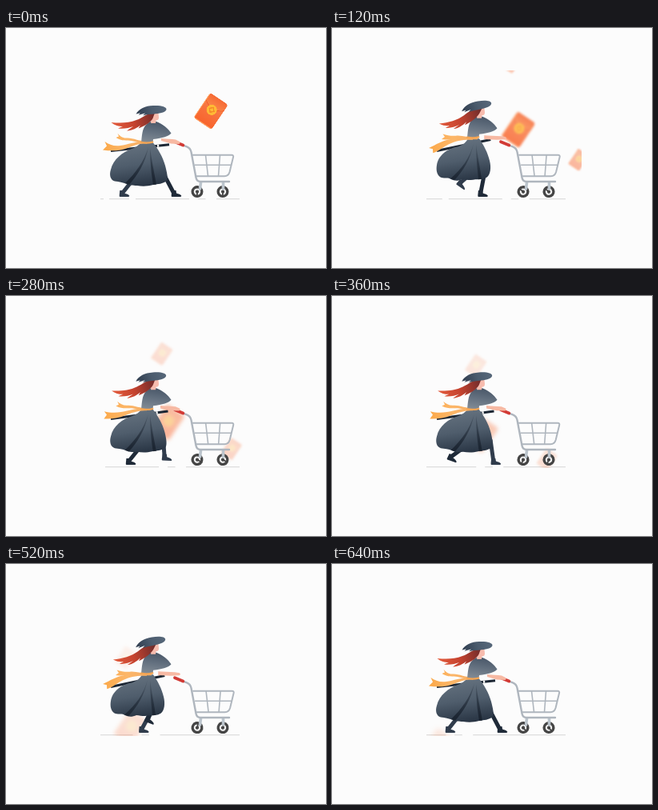
Write an HTML page with a canvas that moves like this. It is 400x300 px and loops after 680 ms.

```html
<!DOCTYPE html>
<html lang="en">
<head>
<meta charset="utf-8">
<title>Shopping stroll</title>
<style>
html, body { margin: 0; width: 100%; height: 100%; overflow: hidden; background: #fcfcfc; }
canvas { display: block; }
</style>
</head>
<body>
<canvas id="stage" width="400" height="300"></canvas>
<script>
const LOOP = 680, STEP = 40, STRIDE = 320;
const PAPER = '#fcfcfc';
const ctx = document.getElementById('stage').getContext('2d');
const RAD = Math.PI / 180;

const lerp = (a, b, u) => a + (b - a) * u;

// Blends two paths that share the same commands
function morph(from, to, u) {
  const ends = to.match(/[\d.]+/g);
  let i = 0;
  return from.replace(/[\d.]+/g, n => lerp(+n, +ends[i++], u).toFixed(2));
}

function gradient(g, x0, y0, x1, y1, ...colors) {
  const paint = g.createLinearGradient(x0, y0, x1, y1);
  colors.forEach((c, i) => paint.addColorStop(i / (colors.length - 1), c));
  return paint;
}

function fill(d, paint, g = ctx) {
  g.fillStyle = paint;
  g.fill(new Path2D(d));
}

function stroke(d, paint, width, g = ctx) {
  g.strokeStyle = paint;
  g.lineWidth = width;
  g.stroke(new Path2D(d));
}

function disc(x, y, r, paint, g = ctx) {
  g.fillStyle = paint;
  g.beginPath();
  g.arc(x, y, r, 0, 7);
  g.fill();
}

function layer(draw) {
  ctx.save();
  draw();
  ctx.restore();
}

function makeCard() {
  const card = document.createElement('canvas');
  card.width = card.height = 240;
  const g = card.getContext('2d');
  g.scale(4, 4);
  g.translate(30, 30);
  g.rotate(34 * RAD);
  g.beginPath();
  g.roundRect(-13.5, -18.7, 27, 37.4, 3);
  g.fillStyle = gradient(g, 0, -18, 0, 19, '#fb8a4e', '#f8733e', '#f9642c');
  g.fill();
  g.clip();
  fill('M-14 -19H14V-10C7 -2 -7 -2 -14 -10Z', gradient(g, 0, -19, 0, -3, '#f66a35', '#fb8a4a'), g);
  stroke('M-14 -10C-7 -2 7 -2 14 -10', '#f05a2c', .8, g);
  stroke('M-13 -18V18M-12 18H13', '#ffa05f', 1, g);
  disc(0, -2, 6.5, '#ffba35', g);
  stroke('M0 -5.5L3.4 -2L0 1.5L-3.4 -2Z', '#f58a28', 1.4, g);
  return card;
}
const cardImage = makeCard();

// Cards fall on a straight diagonal, fading and softening on the way
function drawCard(t, x, y, speed, scale, alpha, end) {
  if (t > end) return;
  const size = 60 * scale;
  layer(() => {
    ctx.globalAlpha = alpha / (1 + (t / 270) ** 2);
    const blur = 3 * scale * (1 - Math.exp(-t / 150));
    if (blur) ctx.filter = `blur(${blur}px)`;
    ctx.drawImage(cardImage, x - speed * t - size / 2, y + speed * t - size / 2, size, size);
  });
}

function drawGround(t) {
  ctx.fillStyle = '#dedede';
  ctx.fillRect(118, 213, 174, 1.3);
  ctx.fillStyle = PAPER;
  for (const [x, width] of [[122, 7], [154, 8], [229, 11], [249.5, 13.5]]) {
    ctx.fillRect(x - t * .1355, 212, width, 3);
  }
}

function drawWheel(x, angle) {
  layer(() => {
    ctx.translate(x, 204.6);
    ctx.rotate(angle);
    disc(0, 0, 7.5, '#454545');
    disc(0, 0, 4.2, '#f4f4f4');
    disc(0, 0, 2.1, '#454545');
    stroke('M0 0H4.5', '#454545', 1.8);
  });
}

function drawCart(t, k) {
  const grey = '#afb6be', turn = t / LOOP * 4 * Math.PI + 1.6;
  drawWheel(239, turn);
  drawWheel(271, turn);
  stroke('M243.5 193L242.5 201M271.5 193V201', '#bcc5cd', 3.6);
  layer(() => {
    ctx.translate(k * .6, 0);
    stroke('M236 171.2H281M249.5 159L252.5 185M267.5 159L265.5 185', grey, 1.6);
    stroke('M233.5 158.8H282Q284.8 158.8 284 161.5L279.5 180Q278 185.2 273 185.2H238', grey, 2);
  });
  stroke('M220 146L226 148.3Q230.5 150 231.5 155L237.5 187Q238.5 192 243 192H279', grey, 2.4);
  stroke('M211 142.2L221.3 146.6', '#d23a35', 3.8);
}

// One stride on the ground sliding back, one in the air swinging forward
function footAt(t) {
  const phase = t / STRIDE % 2;
  if (phase < 1) return { x: lerp(210, 145, phase), y: 207, angle: 0 };
  const p = phase - 1, arc = Math.sin(Math.PI * p);
  return { x: lerp(145, 210, p ** 1.5), y: 207 - 14 * arc, angle: 60 * arc * (1 - p) };
}

function drawLeg(t, lift, color) {
  const { x, y, angle } = footAt(t);
  const hipX = 180, hipY = 162.5 - lift, bone = 27;
  const dx = x - hipX, dy = y - hipY, reach = Math.hypot(dx, dy);
  const bend = Math.min(8, Math.sqrt(Math.max(0, bone * bone - reach * reach / 4)));
  const kneeX = hipX + dx / 2 + dy / reach * bend;
  const kneeY = hipY + dy / 2 - dx / reach * bend;
  stroke(`M${hipX} ${hipY}L${kneeX} ${kneeY}L${x} ${y}`, color, 5);
  layer(() => {
    ctx.translate(x, y);
    ctx.rotate(angle * RAD);
    fill('M-2.7 -4L2.5 -4L3 -.6C6 .3 8.5 1 9.3 2.8Q9.3 3.9 8 3.9H-2.5Q-3.6 3.9 -3.3 2Z', color);
  });
}

function drawSkirt(k) {
  fill(morph(
    'M169 143L183.5 143C190 151 196 161 199 172C201 180 203 188 201 191C196 195 190 195 184 196' +
    'C177 198 170 198 164 197C158 197 155 196 151 195C146 193 141 192 136 191.5' +
    'C130 190 129 183 131 177C134 164 146 155 157 151Q165 148 169 143Z',
    'M170 138L184 138C189 145 195 156 197 166C199 174 198 183 193 186.5C189 189 184 189 179 189' +
    'C173 190.5 168 189 163 188.5C158 191 153 191 149 189C145 185.5 140 188.5 136 186.5' +
    'C131 184 130 177 131 171C133 158 145 150 158 148Q167 145 170 138Z', k),
    gradient(ctx, 162, 143 - 5 * k, 170, 198 - 7 * k, '#65727f', '#4f5d6c', '#283443'));
  const fold = gradient(ctx, 0, 150, 0, 192, 'rgba(24,33,45,.2)', 'rgba(24,33,45,.85)');
  fill(morph(
    'M178 149C172 168 162 181 149 194L154 196C165 183 174 169 178 149Z',
    'M177 144C172 163 162 176 148 188L153 190C164 178 173 164 177 144Z', k), fold);
  fill(morph(
    'M180 150C180 168 182 184 184 196L188 195.5C185 180 182 165 180 150Z',
    'M180 145C180 162 182 176 183 189L187 188.5C185 174 182 160 180 145Z', k), fold);
}

function drawRibbons(k) {
  const gold = gradient(ctx, 122, 0, 180, 0, '#fba94a', '#fcb668', '#f4ad65');
  fill(morph(
    'M181 141.5C169 143 159 137 151 137.5C146 138 142 135 139.5 131.5L141 135.5L137.5 137' +
    'C145 142 151 140 157 141C166 143 172 145 181 143.8Z',
    'M182 136.5C172 137.5 163 133.5 155 134.5C149 135 144 134 138.5 132.5L141 136L137 139' +
    'C144 140 150 139.5 157 138.5C166 138 172 139.5 182 139Z', k), gold);
  fill(morph(
    'M176 142C163 141 153 146 143 147C135 148 129 146 123.5 142L126 147.5L121 152.5' +
    'C132 154 142 153.5 149 151C158 148 165 144 176 144.5Z',
    'M176 137C165 136 154 137 146 139C137 141 131 145 121 150.5L126 151.5L126.5 156.5' +
    'C134 154 138 149 146 145C155 140 165 139 176 139.5Z', k), gold);
}

function drawFarSleeve(k) {
  const x = 204 - 6 * k, y = 145.7 - 6.5 * k;
  ctx.lineCap = 'butt';
  stroke(`M131 153.5L${x} ${y}`, '#1d2734', 3);
  stroke(`M${x - 15} ${y + 1.7}l2.2 -.3`, '#f4f4f4', 3);
  ctx.lineCap = 'round';
}

function drawArm(k) {
  fill(morph(
    'M194 138C201 139 207 138.5 212 139.5L217 142Q218.5 144.5 216 145L206 144.5L194 141Z',
    'M190 134C197 134.5 204 134.5 211 135L217 136Q219 138 216.5 139L206 139.5L190 139Z', k), '#f7b9a3');
}

function drawTorso() {
  fill('M181 117H188C196 120 203 126 206.5 131.5C203 135.5 196 137.5 184 139L183.5 143.5H169' +
    'C170 135 170 126 175 121Q178 118 181 117Z',
    gradient(ctx, 186, 117, 182, 143, '#4a5869', '#647180', '#808a94'));
  stroke('M169 142.8Q176 144.4 183.3 142.6', '#f5a553', 2.2);
}

function drawHair(k) {
  fill(morph(
    'M186 106C177 105 172 112 163 115C153 119 143 119 131.5 118C136 122 141 123 146 123L140 125.5' +
    'C147 126.5 154 125 159 123L151 128.5C158 128 164 125 168 121.5L165.5 125.5C172 123 180 119 183.5 113Z',
    'M188 99.5C178 99 171 104 165 109C157 115 146 118.5 134 119.5C139 122 143 122.5 147 122L142 125' +
    'C149 125.5 154 123 159 121L152 126C159 125 164 121 168 117L166 121C173 118 180 113 184 107Z', k),
    gradient(ctx, 133, 121, 185, 109 - 5 * k, '#e35a3b', '#c5432f', '#742d2b'));
}

function drawHat(k) {
  ctx.translate(188, 112);
  ctx.rotate(-7 * k * RAD);
  ctx.translate(-188, -112);
  fill('M162.5 107.5C166 101 174 97.3 184 97C194 96.5 200.5 98.5 200.5 101.5C200.3 105 194 106.6 187 107.2' +
    'C181 107.8 176 108 171 109.2L174 106.5L165.5 108.8L168 106.3Z',
    gradient(ctx, 166, 107, 198, 98, '#334153', '#4b5b6d', '#566779'));
}

function drawWoman(t, k) {
  const lift = 6.5 * k;
  const raised = draw => layer(() => {
    ctx.translate(0, -lift);
    draw(k);
  });
  drawLeg(t + STRIDE, lift, '#303c4c');
  drawLeg(t, lift, '#1f2a38');
  drawFarSleeve(k);
  drawSkirt(k);
  drawRibbons(k);
  drawArm(k);
  raised(drawTorso);
  raised(() => fill('M183 106H190.4L191 111.5Q191.2 115.5 187.5 115.5L187 119H181Z', '#f7bcae'));
  drawHair(k);
  raised(drawHat);
}

function draw(t) {
  // Body rise, 0 at full stride to about 1 as the legs pass
  const k = 1.07 * Math.abs(Math.sin(Math.PI * t / STRIDE)) ** 1.5;
  ctx.fillStyle = PAPER;
  ctx.fillRect(0, 0, 400, 300);
  layer(() => {
    ctx.beginPath();
    ctx.rect(118, 53, 194, 162);
    ctx.clip();
    ctx.lineCap = ctx.lineJoin = 'round';
    drawGround(t);
    drawCard(t, 256, 104, .193, 1, 1, LOOP);
    drawCard(t, 328, 145, .165, .62, .55, 400);
    drawCard(t, 247, 20, .187, .65, .42, 520);
    drawCart(t, k);
    drawWoman(t, k);
  });
}

const start = performance.now();
function tick() {
  const t = (performance.now() - start) % LOOP;
  draw(Math.floor(t / STEP) * STEP);
  requestAnimationFrame(tick);
}
tick();
</script>
</body>
</html>
```
